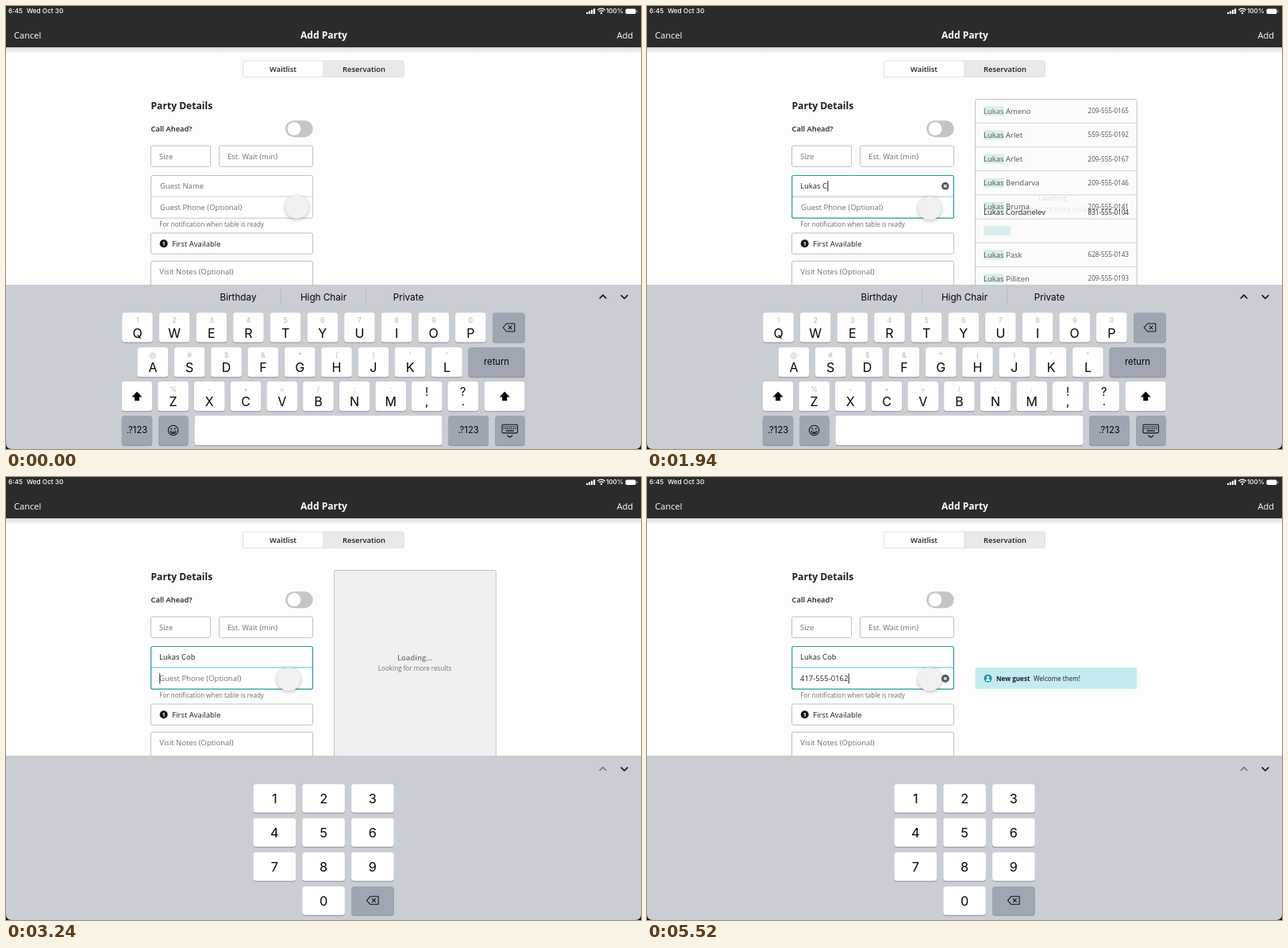
Recreate the animation shown at these times as an HTML page with a canvas. Size 800 by 558 pixels, loop 5560 ms.

```html
<!DOCTYPE html>
<html lang="en">
<head>
<meta charset="utf-8">
<title>Add Party</title>
<style>
  html, body { margin: 0; width: 100%; height: 100%; overflow: hidden; background: #fefdfe; }
  canvas { display: block; width: 800px; height: 558px; }
</style>
</head>
<body>
<canvas id="stage"></canvas>
<script>
const W = 800, H = 558, LOOP = 5560;
const canvas = document.getElementById('stage');
const dpr = window.devicePixelRatio || 1;
canvas.width = W * dpr;
canvas.height = H * dpr;
const c = canvas.getContext('2d');
c.scale(dpr, dpr);

const OPEN = '"Open Sans", "Noto Sans", sans-serif';
const SYS = 'Inter, Roboto, sans-serif';
const INK = '#1f1f21', GREY = '#6d6e72', LINE = '#c3c4c8', TEAL = '#2b959d', CYAN = '#4fc6d3';

const NAME = 'Lukas Cob';
const NAME_AT = [1150, 1300, 1480, 1510, 1570, 1700, 1790, 2490, 2730];
const PHONE = '417-555-0162';
const PHONE_AT = [3850, 3940, 4030, 4450, 4450, 4610, 4700, 4820, 4820, 4940, 5090, 5240];
const GUESTS = [
  ['Ameno', '209-555-0165'], ['Arlet', '559-555-0192'], ['Arlet', '209-555-0167'],
  ['Bendarva', '209-555-0146'], ['Bruma', '209-555-0141'], ['Cordanelev', '831-555-0104'],
  ['Pask', '628-555-0143'], ['Pilliten', '209-555-0193']
];
const PICK = 5, ROW_TOP = 117.5, ROW_H = 30.17;

const clamp = v => Math.max(0, Math.min(1, v));
const span = (t, a, b) => clamp((t - a) / (b - a));
const sine = u => (1 - Math.cos(Math.PI * u)) / 2;
const mix = (a, b, u) => a + (b - a) * u;
const typed = (s, times, t) => s.slice(0, times.filter(at => t >= at).length);

// y is the middle of the capitals
function text(s, x, y, size, o = {}) {
  c.font = `${o.w || 400} ${size}px ${o.font || OPEN}`;
  c.textAlign = o.align || 'left';
  c.fillStyle = o.color || INK;
  c.fillText(s, x, y + size * 0.357);
}
function width(s, size, w = 400) {
  c.font = `${w} ${size}px ${OPEN}`;
  return c.measureText(s).width;
}
function rect(x, y, w, h, color) {
  c.fillStyle = color;
  c.fillRect(x, y, w, h);
}
function box(x, y, w, h, r, fill, stroke, lw = 1) {
  c.beginPath();
  c.roundRect(x, y, w, h, r);
  if (fill) { c.fillStyle = fill; c.fill(); }
  if (stroke) { c.strokeStyle = stroke; c.lineWidth = lw; c.stroke(); }
}
function disc(x, y, r, color) {
  c.beginPath();
  c.arc(x, y, r, 0, 7);
  c.fillStyle = color;
  c.fill();
}
function poly(pts, color, lw, fill, close) {
  c.beginPath();
  pts.forEach(([x, y]) => c.lineTo(x, y));
  if (close) c.closePath();
  if (fill) { c.fillStyle = color; c.fill(); return; }
  c.strokeStyle = color;
  c.lineWidth = lw;
  c.stroke();
}
function cross(x, y, r, color, lw) {
  poly([[x - r, y - r], [x + r, y + r]], color, lw);
  poly([[x - r, y + r], [x + r, y - r]], color, lw);
}
function fade(a, draw) {
  c.save();
  c.globalAlpha *= a;
  draw();
  c.restore();
}

function header() {
  const g = c.createLinearGradient(0, 52, 0, 60);
  g.addColorStop(0, 'rgba(0,0,0,.14)');
  g.addColorStop(1, 'rgba(0,0,0,0)');
  rect(0, 52, W, 8, g);
  rect(0, 0, W, 52, '#2b2b2c');
  const white = { color: '#fff', font: SYS, w: 500 };
  text('6:45', 3, 6.5, 8.2, white);
  text('Wed Oct 30', 26, 6.5, 8.2, white);
  text('100%', 778, 6.5, 8.2, { ...white, align: 'right' });
  for (let i = 0; i < 4; i++) box(731 + i * 3, 7.8 - i * 1.5, 2.2, 2.2 + i * 1.5, 0.5, '#fff');
  c.strokeStyle = '#fff';
  c.lineWidth = 1.3;
  for (const r of [3.8, 6.4]) {
    c.beginPath();
    c.arc(750, 9.6, r, -Math.PI * 0.76, -Math.PI * 0.24);
    c.stroke();
  }
  disc(750, 8.9, 1.2, '#fff');
  box(780.5, 3.5, 13, 6.5, 1.8, '#fff');
  rect(794.5, 5.5, 1, 2.5, '#aaa');
  text('Cancel', 10, 37, 11.1, { color: '#fff' });
  text('Add Party', 400.5, 37, 12, { color: '#fff', w: 700, align: 'center' });
  text('Add', 790, 37, 11.1, { color: '#fff', align: 'right' });
}

function clearIcon(y) {
  disc(375.8, y, 4.8, '#58595c');
  cross(375.8, y, 1.7, '#fff', 1.3);
}

function field(value, hint, y, focused) {
  text(value || hint, focused || value ? 193 : 194, y, 9.5, { color: value ? INK : GREY });
  if (!focused) return;
  rect(193.3 + width(value, 9.5), y - 6.5, 1, 13, '#222');
  if (value) clearIcon(y);
}

function form(t) {
  box(298.5, 69, 203, 20.5, 2.5, '#e9e8ec', '#e3e2e6');
  box(299, 69.5, 100, 19.5, 2, '#fefefe');
  text('Waitlist', 349, 79.3, 9.4, { w: 600, align: 'center' });
  text('Reservation', 451, 79.3, 9.4, { w: 600, align: 'center' });

  text('Party Details', 182.5, 126, 12.1, { w: 700 });
  text('Call Ahead?', 182.5, 155, 9.4, { w: 600 });
  box(352, 144.2, 34.7, 21, 10.5, '#c4c4c9');
  disc(363, 154.7, 8.4, '#fff');

  const line = '#bfc0c4';
  box(182.5, 176, 75, 26.3, 2, '#fff', line);
  text('Size', 193, 189.3, 9.5, { color: GREY });
  box(268.5, 176, 118, 26.3, 2, '#fff', line);
  text('Est. Wait (min)', 279, 189.3, 9.5, { color: GREY });

  const onName = t >= 550 && t < 2880, onPhone = t >= 2880;
  box(182.7, 213.5, 203.6, 53.7, 2, '#fff');
  rect(183, 239.5, 203, 1, onPhone ? CYAN : onName ? '#aebfc2' : '#d2d3d6');
  box(182.7, 213.5, 203.6, 53.7, 2, null, t >= 550 ? TEAL : line, t >= 550 ? 1.2 : 1);
  field(typed(NAME, NAME_AT, t), 'Guest Name', 226.8, onName);
  field(typed(PHONE, PHONE_AT, t), 'Guest Phone (Optional)', 253.9, onPhone);

  text('For notification when table is ready', 193.3, 275, 8.05, { color: GREY });
  box(182.5, 286, 204, 26.3, 2, '#fff', line);
  disc(198.7, 299.2, 5, '#151517');
  text('1', 198.7, 299.2, 7, { color: '#fff', w: 700, align: 'center' });
  text('First Available', 209.3, 299.2, 9.5);
  box(182.5, 321.3, 204, 50, 2, '#fff', line);
  text('Visit Notes (Optional)', 193.3, 335, 9.5, { color: GREY });
}

function guestRow(i, y, dark) {
  const [last, phone] = GUESTS[i];
  text('Lukas ' + last, 424, y, 9.5, { color: dark ? INK : '#333437' });
  text(phone, 607, y, 8.1, { color: dark ? INK : '#333437', align: 'right' });
}
function highlight(s, y) {
  rect(424, y - 6, width(s, 9.5), 12, '#d6ecee');
}
function loading(y) {
  text('Loading...', 515, y, 9.5, { w: 600, color: '#737478', align: 'center' });
  text('Looking for more results', 515, y + 14.2, 8.1, { color: '#737478', align: 'center' });
}

function results(t) {
  if (t < 1150 || t >= 4450) return;
  c.save();
  c.globalAlpha = 1 - span(t, 4180, 4450);
  c.beginPath();
  c.rect(412, 116, 208, 236);
  c.clip();
  box(413.5, ROW_TOP, 203.8, 260, 2, '#fcfcfc');
  if (t >= 2730) {
    rect(413.5, ROW_TOP, 203.8, 240, '#f0f0f1');
    loading(227.4);
  } else {
    const k = sine(span(t, 1795, 2363));
    const query = typed(NAME, NAME_AT, t);
    const mark = query.slice(0, 5);
    GUESTS.forEach((g, i) => {
      const y = 132.3 + i * ROW_H;
      rect(414, ROW_TOP + (i + 1) * ROW_H - 0.8, 203, 1, '#d0d1d4');
      highlight(i === PICK && k ? query : mark, y);
      if (i !== PICK || !k) guestRow(i, y, false);
    });
    if (k) {
      fade(k, () => {
        rect(414, ROW_TOP, 203, 29.5, '#f8f8f8');
        highlight(k > 0.97 ? query : mark, 132.3);
        rect(414, 147.5, 203, 210, '#eeeeef');
        rect(414, 147, 203, 1, '#cfd0d2');
        loading(241.6);
      });
      guestRow(PICK, mix(132.3 + PICK * ROW_H, 132.3, k), true);
    }
  }
  box(413.5, ROW_TOP, 203.8, 260, 2, null, LINE);
  c.restore();
}

function banner(t) {
  const k = 1 - Math.pow(1 - span(t, 4250, 5000), 3);
  if (!k) return;
  fade(k, () => {
    box(413.5, 240, 203.8, 27, 2, '#c4ecf0');
    disc(429.5, 253.7, 5, '#1997a8');
    disc(429.5, 252.2, 1.6, '#e9fbfc');
    box(426.9, 254.2, 5.2, 2.7, [2, 2, 1, 1], '#e9fbfc');
    text('New guest', 440, 254, 8.1, { w: 700 });
    text('Welcome them!', 487, 254, 8.1);
  });
}

function touch(t) {
  const a = Math.floor(Math.min(t, 90) / 30) / 3;
  let x = mix(366.5, 343.5, a), y = mix(253, 229.5, a);
  if (t >= 550) {
    const k = sine(span(t, 1600, 1900));
    x = mix(350.7, 356.2, k);
    y = mix(239.6, 254.8, k);
  }
  c.save();
  c.shadowColor = 'rgba(0,0,0,.28)';
  c.shadowBlur = 4 * dpr;
  c.shadowOffsetY = 1 * dpr;
  disc(x, y, 14.8, '#f1f1f2');
  c.restore();
}

function key(x, y, w, dark, h = 37.2) {
  box(x, y + 1, w, h, 3.5, '#8d9096');
  box(x, y, w, h, 3.5, dark ? '#9fa6b2' : '#fefeff');
}
function letter(s, x, y, size = 16) {
  text(s, x, y, size, { font: SYS, align: 'center', color: '#050505' });
}
function backspace(x, y) {
  c.lineJoin = 'round';
  poly([[x - 7.3, y], [x - 3, y - 5], [x + 7.3, y - 5], [x + 7.3, y + 5], [x - 3, y + 5]], '#151515', 1.1, false, true);
  cross(x + 1.6, y, 2.3, '#151515', 1.1);
}
function shift(x, y) {
  poly([[x, y - 6], [x + 6.5, y + 0.8], [x + 3, y + 0.8], [x + 3, y + 5.5],
    [x - 3, y + 5.5], [x - 3, y + 0.8], [x - 6.5, y + 0.8]], '#050505', 1, true);
}
function chevron(x, y, dir, color) {
  poly([[x - 4.3, y - dir * 2.2], [x, y + dir * 2.2], [x + 4.3, y - dir * 2.2]], color, 1.6);
}

function letters() {
  [['Birthday', 292.5], ['High Chair', 400], ['Private', 507]].forEach(([s, x]) => letter(s, x, 366.5, 11.7));
  rect(346, 357, 1, 19, '#b5b9c0');
  rect(453, 357, 1, 19, '#b5b9c0');
  chevron(752, 366.3, -1, '#111');
  chevron(779, 366.3, 1, '#111');
  const rows = [
    ['QWERTYUIOP', '1234567890', 165.5, 46.65, 386.3],
    ['ASDFGHJKL', '@#$&*()\'"', 184.9, 46.32, 430],
    ['ZXCVBNM', '%-+=/;:', 210.6, 45.7, 473]
  ];
  for (const [keys, subs, x0, step, y] of rows) {
    [...keys].forEach((s, i) => {
      const x = x0 + i * step;
      key(x - 19.3, y, 38.6, false);
      text(subs[i], x, y + 9.6, 9, { font: SYS, align: 'center', color: '#b9babe' });
      letter(s, x, y + 25.5);
    });
  }
  key(613, 386.3, 40.7, true);
  backspace(633.5, 405);
  key(582.5, 430, 71.2, true);
  letter('return', 618, 448, 11.2);
  key(145.8, 473, 38.4, false);
  shift(165, 491.8);
  key(602.6, 473, 51, false);
  shift(628.2, 491.8);
  [['!', ',', 530.2], ['?', '.', 575.8]].forEach(([a, b, x]) => {
    key(x - 19.3, 473, 38.6, false);
    letter(a, x, 486, 14.5);
    letter(b, x, 497.5, 15);
  });
  key(145.8, 516, 38.4, true);
  letter('.?123', 165, 534.3, 11.2);
  key(192, 516, 37.5, true);
  c.strokeStyle = '#111';
  c.lineWidth = 1.1;
  c.beginPath();
  c.arc(210.6, 534.5, 6.2, 0, 7);
  c.stroke();
  disc(208.4, 532.5, 1, '#111');
  disc(212.8, 532.5, 1, '#111');
  c.beginPath();
  c.arc(210.6, 535, 4, 0, Math.PI);
  c.closePath();
  c.fillStyle = '#111';
  c.fill();
  rect(207.8, 535.6, 5.6, 1, '#d5d8dd');
  key(237.5, 516, 312, false);
  key(557, 516, 51, true);
  letter('.?123', 582.5, 534.3, 11.2);
  key(616.2, 516, 37.5, true);
  box(625, 527.3, 19.5, 10.6, 1.5, null, '#111', 1.1);
  for (let r = 0; r < 2; r++)
    for (let i = 0; i < 7; i++) rect(626.8 + i * 2.4, 529.3 + r * 2.4, 1.3, 1.3, '#111');
  rect(629.5, 534.4, 10.5, 1.3, '#111');
  poly([[631.3, 540.8], [634.8, 543.2], [638.3, 540.8]], '#111', 1.2);
}

function digits() {
  chevron(752, 367.8, -1, '#75787e');
  chevron(779, 367.8, 1, '#111');
  for (let i = 0; i < 12; i++) {
    const x = 311.5 + (i % 3) * 61.8, y = 386.8 + Math.floor(i / 3) * 43;
    if (i === 9) continue;
    key(x, y, 53.6, i === 11, 36);
    if (i === 11) backspace(x + 26.7, y + 17.5);
    else letter(i === 10 ? '0' : String(i + 1), x + 26.8, y + 18.5, 16.3);
  }
}

function keyboard(t) {
  rect(0, 351, W, 207, '#c9cdd4');
  if (t < 3240) letters(); else digits();
  for (const [x, s] of [[0, 1], [W, -1]]) {
    c.beginPath();
    c.moveTo(x, H - 7);
    c.quadraticCurveTo(x, H, x + 7 * s, H);
    c.lineTo(x, H);
    c.fillStyle = '#0a0a0a';
    c.fill();
  }
}

function draw(t) {
  rect(0, 0, W, H, '#fefdfe');
  header();
  form(t);
  results(t);
  banner(t);
  touch(t);
  // the clear button stays above the touch dot
  if (t >= PHONE_AT[0]) clearIcon(253.9);
  keyboard(t);
}

const start = performance.now();
function tick(now) {
  draw(Math.max(0, now - start) % LOOP);
  requestAnimationFrame(tick);
}
draw(0);
requestAnimationFrame(tick);
</script>
</body>
</html>
```
